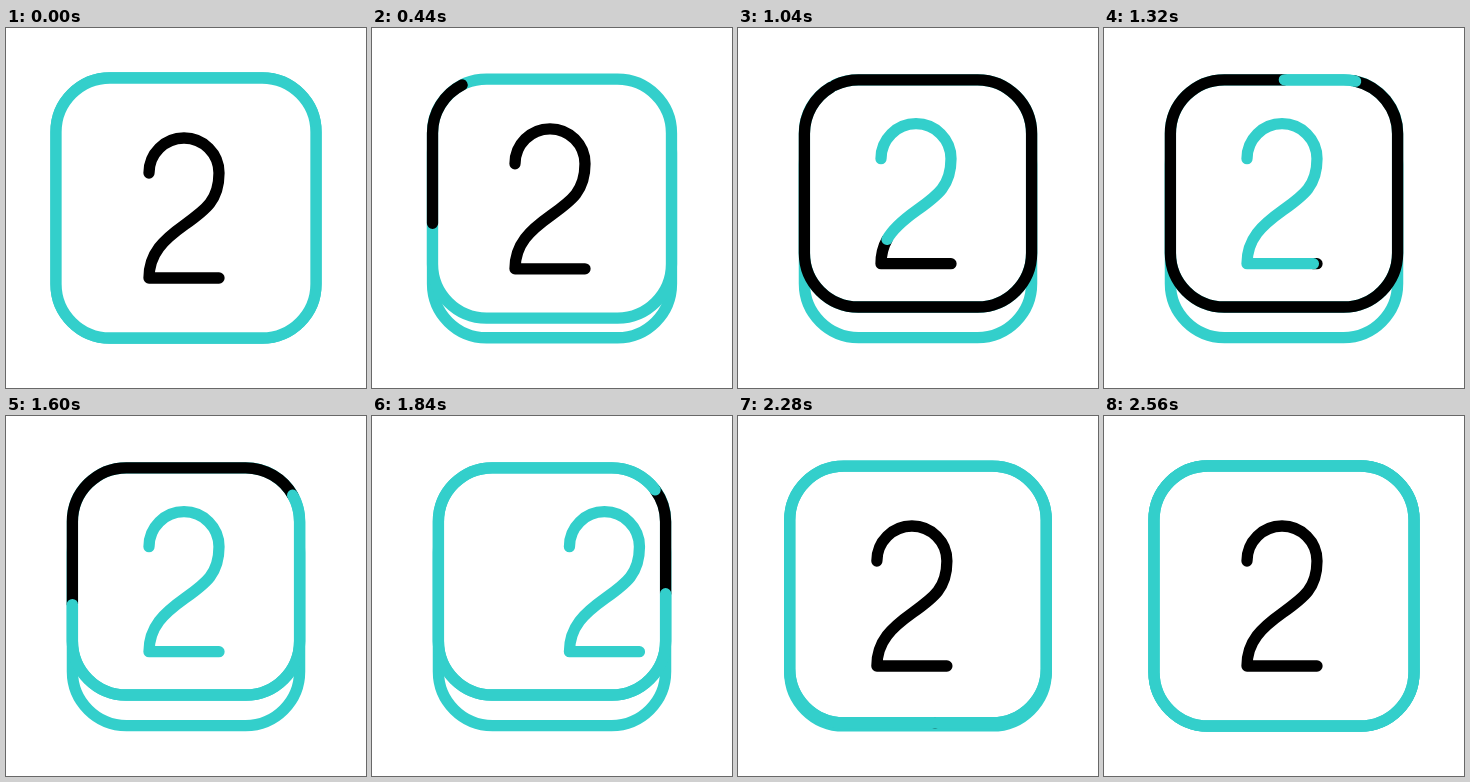
These frames come from a looping animation (360 px wide and 360 px high, 2800 ms). An HTML page:

```html
<!DOCTYPE html>
<html lang="en">
<head>
<meta charset="utf-8">
<title>Key press</title>
<style>
  html, body { margin: 0; height: 100%; overflow: hidden; background: #fff; }
  svg { display: block; width: 100vw; height: 100vh; }
  .line { fill: none; stroke-width: 11.3; stroke-linecap: round; stroke-linejoin: round; }
  .teal { stroke: #33cfcb; }
  .black { stroke: #000; }
</style>
</head>
<body>
<svg viewBox="0 0 360 360">
  <defs>
    <path id="two" pathLength="1" d="M143 145A35 35 0 0 1 213 145C213 172 200 181.5 179 196.5S143 225 143 250H213"/>
    <clipPath id="inside"><rect class="cap" rx="54"/></clipPath>
  </defs>
  <rect id="base" class="line teal" rx="54"/>
  <rect class="cap" rx="54" fill="#fff"/>
  <g clip-path="url(#inside)">
    <g id="leaving">
      <use href="#two" class="line black" id="digitBlack"/>
      <use href="#two" class="line teal" id="digitTeal"/>
    </g>
    <use href="#two" class="line black" id="entering"/>
  </g>
  <rect class="cap line teal" rx="54"/>
  <rect class="cap line black" rx="54" pathLength="1" id="capBlack"/>
  <rect class="cap line teal" rx="54" pathLength="1" id="capTeal"/>
</svg>
<script>
const LOOP = 2800, SLIDE = 250;
const byId = id => document.getElementById(id);
const caps = document.querySelectorAll('.cap');

// Smoothstep; a tail above 1 makes the end softer than the start.
function ease(t, start, end, tail = 1) {
  const x = Math.min(1, Math.max(0, (t - start) / (end - start)));
  const u = 1 - (1 - x) ** tail;
  return u * u * (3 - 2 * u);
}

function place(box, x, y, width, height) {
  for (const [name, value] of Object.entries({ x, y, width, height })) box.setAttribute(name, value);
}

// Shows a part of a path, as fractions of its length; on a closed path it may wrap.
function trim(id, start, length, closed) {
  const style = byId(id).style;
  style.visibility = length > 0.001 ? 'visible' : 'hidden';
  style.strokeDasharray = length < 1 ? `${length} ${closed ? 1 - length : 2}` : 'none';
  style.strokeDashoffset = -start;
}

function move(id, x, y) {
  byId(id).setAttribute('transform', `translate(${x} ${y})`);
}

function draw(t) {
  const rise = ease(t, 60, 700) - ease(t, 2010, 2550, 2.3);
  const left = 50 + 16.4 * rise, top = 50 + 1.8 * rise;
  const width = 360 - 2 * left, height = 310 - 31 * rise - top;
  caps.forEach(cap => place(cap, left, top, width, height));
  place(byId('base'), left, top + 30.6 * rise, width, height);

  const black = ease(t, 280, 1148, 1.5);
  const teal = ease(t, 1210, 2535, 2.3);
  const tealStart = 0.073 + 0.000509 * (t - 1320);
  if (teal > 0) trim('capBlack', tealStart + teal, 1 - teal, true);
  else trim('capBlack', 0.797 + 0.000288 * (t - 440), black, true);
  trim('capTeal', tealStart, teal, true);

  const digitTeal = ease(t, 655, 1447, 1.5);
  trim('digitBlack', digitTeal, 1 - digitTeal);
  trim('digitTeal', 0, digitTeal);

  const slide = SLIDE * ease(t, 1721, 2552, 2.3);
  move('leaving', slide, -14.3 * rise);
  move('entering', slide - SLIDE, 0);
}

function frame() {
  draw(performance.now() % LOOP);
  requestAnimationFrame(frame);
}
frame();
</script>
</body>
</html>
```
